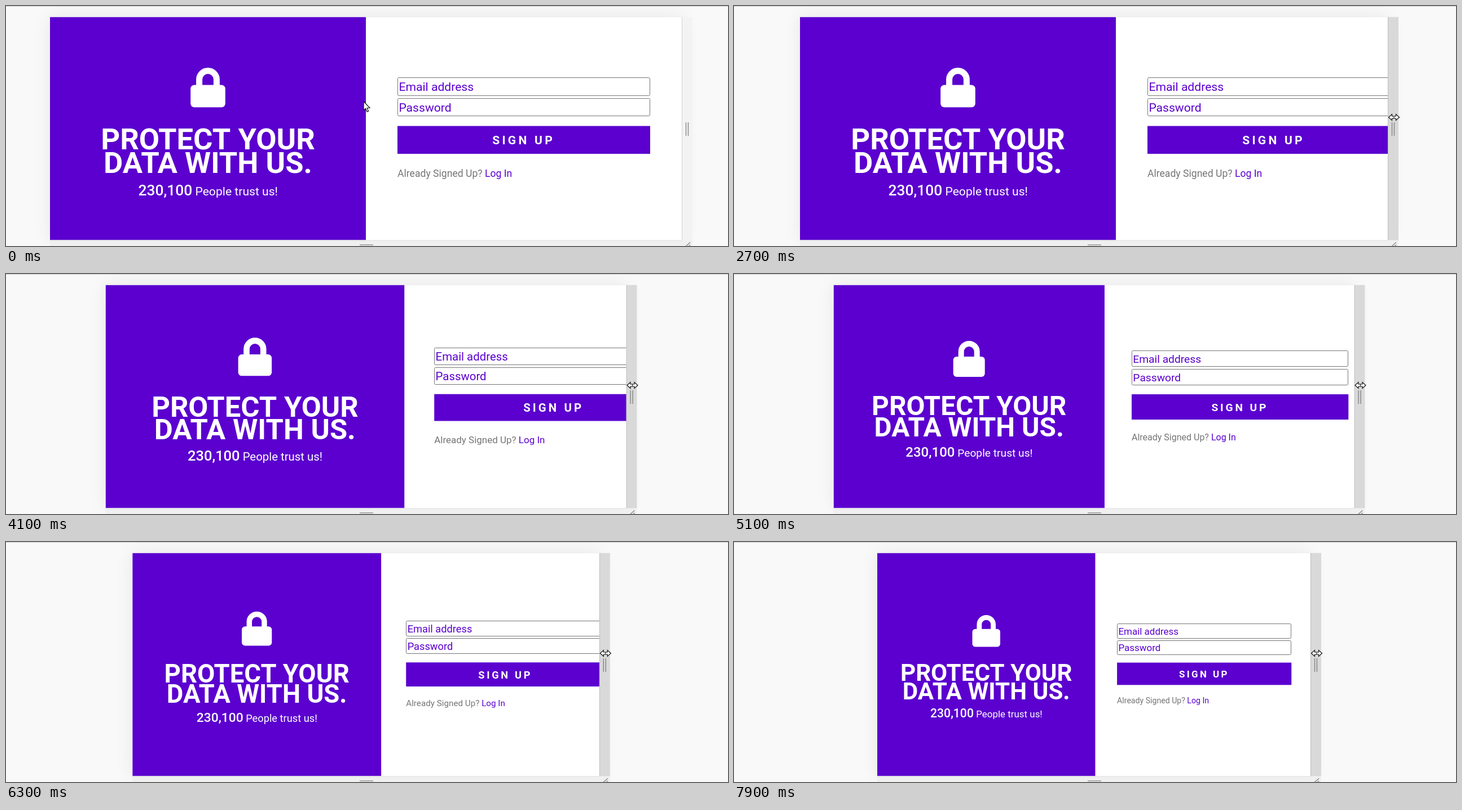
Recreate the animation shown at these times as an HTML page with a canvas. Size 1280 by 427 pixels, loop 8 s.

```html
<!DOCTYPE html>
<html lang="en">
<head>
<meta charset="utf-8">
<title>Responsive sign-up panel</title>
<style>
html, body { margin: 0; width: 100%; height: 100%; overflow: hidden; background: #f9f9f9; }
canvas { display: block; }
</style>
</head>
<body>
<canvas id="stage" width="1280" height="427"></canvas>
<script>
const ctx = document.getElementById('stage').getContext('2d');
const LOOP = 8000, PURPLE = '#5b00cf', TOP = 19.6, HEIGHT = 397, BOTTOM = TOP + HEIGHT, BAND = 19;

// While nothing is dragged the layout only catches up now and then.
const catchUps = [4100, 4300, 4600, 5100, 5500, 6600, 7100, 7500, 7900];

function held(t) {
  const step = Math.floor(t / 100) * 100;
  const dragging = step < 4100 || (step >= 6000 && step < 6600);
  return dragging ? step : catchUps.findLast(c => c <= step);
}

const span = (t, from, to) => Math.min(1, Math.max(0, (t - from) / (to - from)));

function ease(t, from, to) {
  const u = span(t, from, to);
  return u * u * (3 - 2 * u);
}

// Left edge of the frame: two drags inwards with a small nudge between them.
const frameLeft = t => 78 + 85.5 * ease(t, 2300, 3150) + 13 * ease(t, 3400, 4100)
  + 77.5 * ease(t, 5890, 6600);

// Half the page width trails behind the frame.
const halfWidth = t => 560 - 98.5 * ease(t, 3050, 5900)
  - 77.5 * (1 - (1 - span(t, 6000, 8490)) ** 2.4);

const pointerX = t => 634 - 6 * ease(t, 0, 300) + 440 * ease(t, 450, 1300)
  + 141 * ease(t, 1300, 1900);
const pointerY = t => 170 + 12 * ease(t, 100, 300) - 94 * ease(t, 300, 600)
  + 20 * ease(t, 600, 800) + 90 * ease(t, 1300, 1900);

function box(color, x, y, w, h) {
  ctx.fillStyle = color;
  ctx.fillRect(x, y, w, h);
}

function line(color, width, x1, y1, x2, y2) {
  ctx.strokeStyle = color;
  ctx.lineWidth = width;
  ctx.beginPath();
  ctx.moveTo(x1, y1);
  ctx.lineTo(x2, y2);
  ctx.stroke();
}

function text(str, x, y, size, color, weight = 400, align = 'left') {
  ctx.font = `${weight} ${size}px Roboto, sans-serif`;
  ctx.fillStyle = color;
  ctx.textAlign = align;
  ctx.fillText(str, x, y);
  return ctx.measureText(str).width;
}

function lock(cx, y, size) {
  ctx.save();
  ctx.translate(cx, y);
  ctx.scale(size / 512, size / 512);
  ctx.fillStyle = ctx.strokeStyle = '#fff';
  ctx.lineWidth = 80;
  ctx.beginPath();
  ctx.moveTo(-112, 240);
  ctx.arc(0, 152, 112, Math.PI, 0);
  ctx.lineTo(112, 240);
  ctx.stroke();
  ctx.beginPath();
  ctx.roundRect(-224, 224, 448, 288, 48);
  ctx.fill();
  ctx.restore();
}

function pitch(cx, em) {
  const y = v => 212 + (v - 212) * em / 17.6;
  lock(cx, y(109.8), em * 4);
  text('PROTECT YOUR', cx, y(255.4), em * 2.99, '#fff', 700, 'center');
  text('DATA WITH US.', cx, y(297.2), em * 2.99, '#fff', 700, 'center');
  const x = cx - em * 7.02;
  const w = text('230,100', x, y(336.5), em * 1.5, '#fff', 500);
  text(' People trust us!', x + w, y(336.5), em * 1.2, '#fff');
}

function form(x, w, em) {
  const y = v => 219 + (v - 219) * em / 17.6;

  function field(label, top) {
    const fx = Math.round(x), fy = Math.round(y(top));
    ctx.strokeStyle = '#767676';
    ctx.lineWidth = 1;
    ctx.beginPath();
    ctx.roundRect(fx + .5, fy + .5, Math.round(x + w) - fx - 1, Math.round(y(top + 32.6)) - fy - 1, 2);
    ctx.stroke();
    text(label, x + 2.4, y(top + 24), em * 1.2, PURPLE);
  }
  field('Email address', 127.4);
  field('Password', 163.7);

  box(PURPLE, x, y(213.5), w, y(263) - y(213.5));
  ctx.letterSpacing = em * .24 + 'px';
  text('SIGN UP', x + w / 2 - em * 3.17, y(246.4), em * 1.2, '#fff', 700);
  ctx.letterSpacing = '0px';

  const noteW = text('Already Signed Up? ', x, y(303.6), em, '#757575');
  text('Log In', x + noteW, y(303.6), em, PURPLE);
}

function page(L, R, half) {
  const em = 6.4 + .02 * half;
  ctx.save();
  ctx.beginPath();
  ctx.rect(L, TOP, R - L, HEIGHT);
  ctx.clip();
  box(PURPLE, L, TOP, half, HEIGHT);
  pitch(L + half / 2, em);
  form(L + half * 1.1, half * .8, em);
  ctx.restore();
}

function frame(L, R, hover) {
  const tone = Math.round(243 - 26 * hover);
  ctx.save();
  ctx.shadowColor = 'rgba(0,0,0,.08)';
  ctx.shadowBlur = 30;
  box('#fff', L, TOP, R - L, HEIGHT);
  ctx.restore();
  box('#f0f0f0', L, BOTTOM, R - L + BAND, 11);
  box(`rgb(${tone},${tone},${tone})`, R, TOP, BAND, HEIGHT);
  box('#e6e6e6', L, TOP - .6, R - L, 1);
  box('#fff', L, TOP, R - L, HEIGHT);
}

function grips(L, R) {
  box('#dedede', L, BOTTOM, R - L, 1);
  box('rgba(0,0,0,.13)', R, TOP, 1, HEIGHT);
  for (const dx of [7.5, 11.5]) line('#858585', 1.4, R + dx, 207, R + dx, 231);
  line('#999', 1.6, 627, 425, 651, 425);
  line('#858585', 1.3, R + 6, 428.5, R + 15, 420.5);
  line('#858585', 1.3, R + 11, 428.5, R + 15, 425);
}

function shape(x, y, points) {
  ctx.beginPath();
  for (const [px, py] of points) ctx.lineTo(x + px, y + py);
  ctx.closePath();
  ctx.fillStyle = '#fff';
  ctx.fill();
  ctx.strokeStyle = '#111';
  ctx.lineWidth = 1.2;
  ctx.stroke();
}

const arrow = [[0, 0], [0, 15.5], [3.5, 12.3], [6, 18.3], [8.6, 17.2], [6.2, 11.5], [11, 11.3]];
const rightHead = [[3.5, -2], [3.5, -5.5], [9.5, 0], [3.5, 5.5], [3.5, 2]];
const resize = [...rightHead, ...rightHead.map(([x, y]) => [-x, -y])];

function pointer(x, y, R) {
  if (x < R) return shape(x, y, arrow);
  shape(x, y, resize);
  line('#111', 1, x, y - 2, x, y + 2);
}

function draw(now) {
  const t = held(now % LOOP);
  const L = frameLeft(t), R = 1276 - L;
  box('#f9f9f9', 0, 0, 1280, 427);
  frame(L, R, span(t, 1700, 2000));
  page(L, R, halfWidth(t));
  grips(L, R);
  box('#c8c8c8', 0, 0, 1280, 1);
  pointer(pointerX(t) + 78 - L, pointerY(t), R);
}

function tick() {
  draw(performance.now());
  requestAnimationFrame(tick);
}
tick();
</script>
</body>
</html>
```
